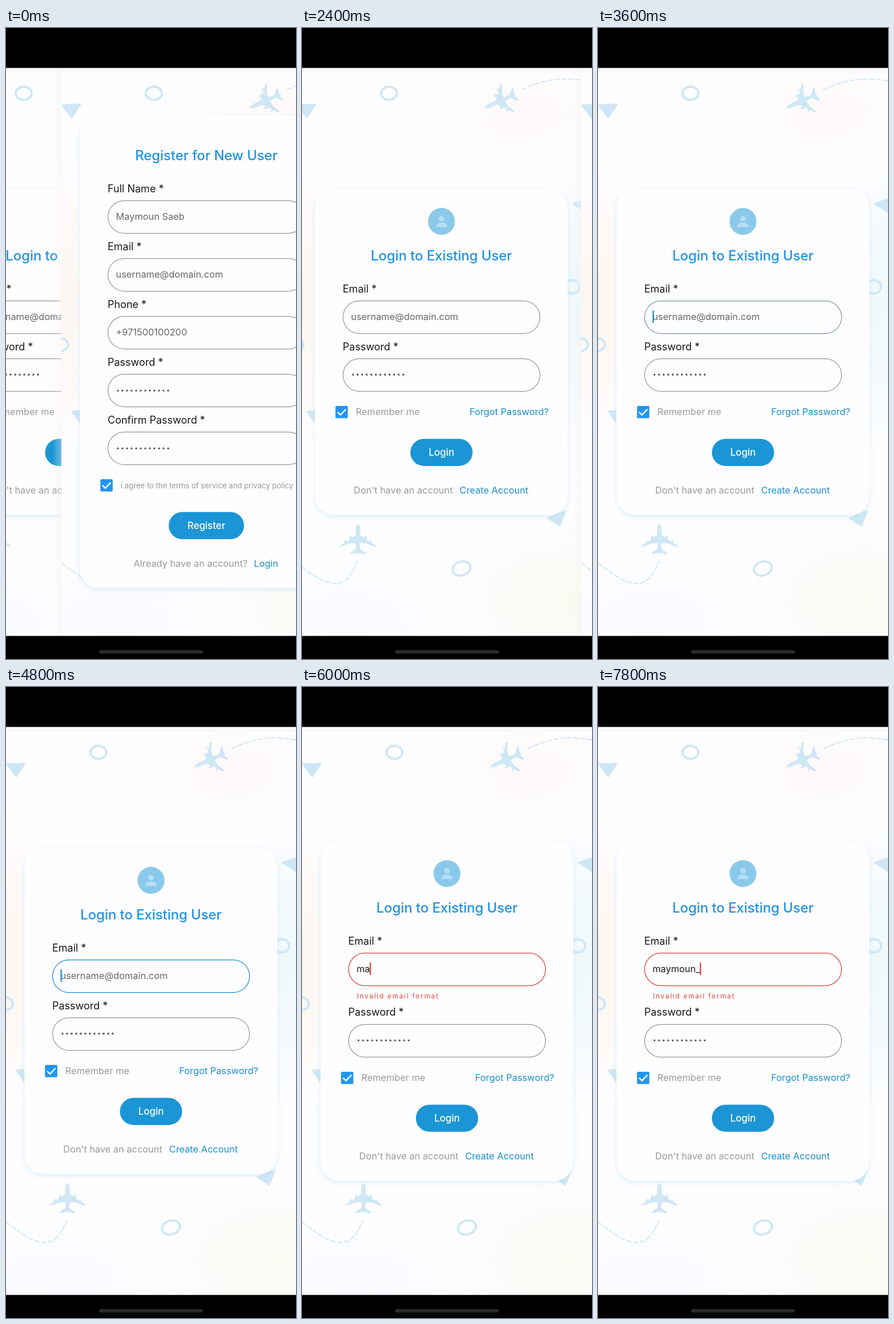
Write an HTML page that moves like this. It is 508 by 1102 pixels and loops after 8 s.

```html
<!DOCTYPE html>
<html lang="en">
<head>
<meta charset="utf-8">
<title>Sign-in screens</title>
<style>
html, body { margin: 0; width: 100%; height: 100%; overflow: hidden; background: #000; }
svg { display: block; width: 100%; height: 100%; }
text { font-family: Inter, Roboto, sans-serif; font-optical-sizing: none; white-space: pre; }
.title { font-size: 23.8px; font-weight: 500; fill: #1e93e6; text-anchor: middle; }
.label { font-size: 18px; fill: #19191b; }
.body { font-size: 16.35px; }
.hint { fill: #666568; }
.grey { fill: #99989b; }
.link { fill: #1a8fce; }
.typed { fill: #1c1c1e; }
.small { font-size: 13.1px; }
.button { font-size: 16.9px; font-weight: 500; fill: #fff; text-anchor: middle; }
.error { font-size: 11.6px; letter-spacing: 1.85px; fill: #da4636; }
.field { fill: none; stroke: #97969a; stroke-width: 1.25; }
.card { fill: #fefdff; filter: url(#soft); }
.shape { fill: #cfe7f5; }
.ring { fill: none; stroke: #cfe7f5; stroke-width: 4; }
.trail { fill: none; stroke: #cfe7f5; stroke-width: 2; stroke-dasharray: 9 3; }
</style>
</head>
<body>
<svg id="stage" viewBox="0 0 508 1102" preserveAspectRatio="none"></svg>
<script>
const STEP = 200, LOOP = 8000, TEXT_X = 95.5;
const typedName = "maymoun_";
const keyTimes = [5600, 6000, 6400, 6600, 6800, 7000, 7200, 7800];

const text = (cls, x, y, s, id = "") =>
  `<text ${id && `id="${id}"`} class="${cls}" x="${x}" y="${y}">${s}</text>`;
const card = (y, h, id = "") =>
  `<rect ${id && `id="${id}"`} class="card" x="32.3" y="${y}" width="443" height="${h}" rx="33"/>`;
const field = (y, id = "") =>
  `<rect ${id && `id="${id}"`} class="field" x="81.6" y="${y}" width="345" height="57" rx="28.5"/>`;
const dots = y =>
  `<path d="M99 ${y}h90" stroke="#5f5e62" stroke-width="3.6" stroke-linecap="round" stroke-dasharray="0 8"/>`;
const label = (y, s) => text("label", 81, y, s);
const check = y =>
  `<rect x="68.3" y="${y - 10.8}" width="21.6" height="21.6" rx="2" fill="#2196f3"/>
   <path d="M72 ${y}l5 5 9.5-10" fill="none" stroke="#fff" stroke-width="2.4"/>`;
const button = (w, y, s) =>
  `<rect x="${254 - w / 2}" y="${y - 23.7}" width="${w}" height="47.4" rx="23.7" fill="#1b95d5"/>`
  + text("button", 254, y + 5.6, s);

const ring = (x, y, rx, ry, turn = 0) =>
  `<ellipse class="ring" rx="${rx}" ry="${ry}" transform="translate(${x} ${y}) rotate(${turn})"/>`;
const tri = pts =>
  `<polygon class="shape" points="${pts}" stroke="#cfe7f5" stroke-width="3" stroke-linejoin="round"/>`;
const glow = (x, y, rx, ry, i) =>
  `<ellipse cx="${x}" cy="${y}" rx="${rx}" ry="${ry}" fill="url(#glow${i})"/>`;
const glowDef = (color, i) =>
  `<radialGradient id="glow${i}"><stop stop-color="${color}"/>
   <stop offset=".5" stop-color="${color}" stop-opacity=".6"/>
   <stop offset="1" stop-color="${color}" stop-opacity="0"/></radialGradient>`;

const halfPlane = "M0-27C3-26 4-21 4-15V-8L11-3V-6Q13-8 15-6V0L21 4V1Q23 0 24 2V6L30 9Q32 11 31 13"
  + "L14 6.5 4 6 3 16 12 22Q14 24 13 26L2 23 0 27Z";
const plane = transform =>
  `<g class="shape" transform="${transform}"><path d="${halfPlane}"/><path d="${halfPlane}" transform="scale(-1 1)"/></g>`;

const backdrop = `<g id="backdrop" clip-path="url(#page)">
  <rect width="508" height="1102" fill="#fefdff"/>
  ${glow(0, 480, 75, 260, 0)}${glow(508, 480, 110, 270, 1)}${glow(470, 1000, 210, 140, 2)}
  ${glow(90, 1040, 190, 100, 3)}${glow(400, 150, 160, 100, 4)}
  <rect y="70" width="508" height="8" fill="#f9faf7"/>
  ${ring(162, 114, 14, 11.5)}${ring(483, 452, 13, 11.5)}${ring(-1, 553, 13, 11)}${ring(289, 944, 16, 12, -18)}
  ${tri("2,135 33,133.5 18,156")}${tri("485,307 514,297 512,324")}
  ${tri("19,670 50,666 34,691")}${tri("441,856 471,844 461,869")}
  ${plane("translate(358 127) rotate(-114) scale(.88 1.12)")}
  ${plane("translate(107.7 893.5)")}
  <path class="trail" d="M395 108Q450 80 509 93"/>
  <path class="trail" d="M0 934C35 962 55 972 72 970S98 952 107 931"/>
</g>`;

const login = `<g id="login"><use href="#backdrop"/>${card(281, 569.5, "loginCard")}
  <g id="upper">
    <circle cx="254" cy="337.7" r="23.6" fill="#8bc9ea"/>
    <circle cx="254" cy="333" r="4.8" fill="#b5def5"/>
    <path d="M244.5 347.5v-2.5c0-3.5 5.5-5.3 9.5-5.3s9.5 1.8 9.5 5.3v2.5z" fill="#b5def5"/>
    ${text("title", 254, 405.8, "Login to Existing User")}
    ${label(461.5, "Email *")}${field(476.5, "emailBox")}
    ${text("body hint", TEXT_X, 509.5, "", "email")}
    <rect id="caret" y="493" width="2.3" height="22" rx="1"/>
  </g>
  ${text("error", 96.3, 543.5, "Invalid email format", "error")}
  <g id="lower">
    ${label(562.5, "Password *")}${field(577.5)}${dots(605.4)}
    ${check(670.8)}${text("body grey", 104, 676.4, "Remember me")}
    ${text("body link", 303.3, 676.4, "Forgot Password?")}
    ${button(109, 741.2, "Login")}
    ${text("body grey", 100.3, 813, "Don't have an account")}
    ${text("body link", 285.7, 813, "Create Account")}
  </g></g>`;

const rows = [
  ["Full Name *", "Maymoun Saeb"], ["Email *", "username@domain.com"],
  ["Phone *", "+971500100200"], ["Password *"], ["Confirm Password *"]
].map(([name, hint], i) => {
  const y = 301.5 + i * 101;
  return label(y - 15, name) + field(y) + (hint ? text("body hint", TEXT_X, y + 33, hint) : dots(y + 28.7));
}).join("");

const register = `<g id="register">
  <rect x="-16" y="70" width="16" height="992" fill="url(#edge)"/>
  <use href="#backdrop"/>${card(153, 825)}
  ${text("title", 254, 230.8, "Register for New User")}${rows}
  ${check(798.7)}${text("small grey", 104, 803.6, "i agree to the terms of service and privacy policy")}
  ${button(132, 869, "Register")}
  ${text("body grey", 126.6, 940.5, "Already have an account?")}
  ${text("body link", 337.3, 940.5, "Login")}</g>`;

document.getElementById("stage").innerHTML = `<defs>
  <clipPath id="page"><rect width="508" height="1102"/></clipPath>
  <filter id="soft" x="-10%" y="-10%" width="120%" height="120%">
    <feDropShadow dx="0" dy="3" stdDeviation="4" flood-color="#9fd3f0" flood-opacity=".38"/>
  </filter>
  <linearGradient id="edge"><stop stop-color="#f5f2ee" stop-opacity="0"/><stop offset="1" stop-color="#f5f2ee" stop-opacity=".4"/></linearGradient>
  ${["#fcf6f0", "#eef8fa", "#faf9f2", "#f8faff", "#fdf9f9"].map(glowDef).join("")}
  ${backdrop}</defs>
  ${login}${register}
  <path d="M0 0H508V69.7H0zM0 1061.7H508V1102H0z"/>
  <rect x="163" y="1086.5" width="182" height="6" rx="3" fill="#2b2b2b"/>`;

const $ = id => document.getElementById(id);
const set = (id, attrs) => { for (const k in attrs) $(id).setAttribute(k, attrs[k]); };

// Left edges of the register and login pages.
function pageOffsets(t) {
  if (t < 200) return [97, -131];
  if (t < 400) return [7, -166];
  if (t < 2400) return [0, -169];
  if (t < 2600) return [489, -9.7];
  return [508, 0];
}

function draw(now) {
  const t = Math.floor(now % LOOP / STEP) * STEP;
  const [regX, logX] = pageOffsets(t);
  set("register", { transform: `translate(${regX})`, visibility: regX < 508 ? "visible" : "hidden" });
  set("login", { transform: `translate(${logX})` });

  const count = keyTimes.filter(k => t >= k).length;
  const grow = Math.max(0, Math.min(1, (t - keyTimes[0] + STEP) / (2 * STEP)));
  const shift = 11.9 * grow;
  set("upper", { transform: `translate(0 ${-shift})` });
  set("lower", { transform: `translate(0 ${shift})` });
  set("loginCard", { y: 281 - shift, height: 569.5 + 2 * shift });
  set("error", { opacity: grow });

  const email = $("email");
  email.textContent = count ? typedName.slice(0, count) : "username@domain.com";
  email.setAttribute("class", count ? "body typed" : "body hint");

  const focus = t < 3600 ? "#97969a" : t < 3800 ? "#7d959f" : "#1b8fce";
  $("emailBox").style.stroke = count ? "#da4636" : focus;

  const since = t - (count ? keyTimes[count - 1] : 3600);
  const lit = since >= 0 && since % 1000 < 600;
  set("caret", {
    x: TEXT_X + (count ? email.getComputedTextLength() - 0.5 : 0),
    fill: count ? "#da4636" : "#1b8fce",
    opacity: lit ? 1 : 0
  });
}

const start = performance.now();
function tick() {
  draw(performance.now() - start);
  requestAnimationFrame(tick);
}
tick();
</script>
</body>
</html>
```
